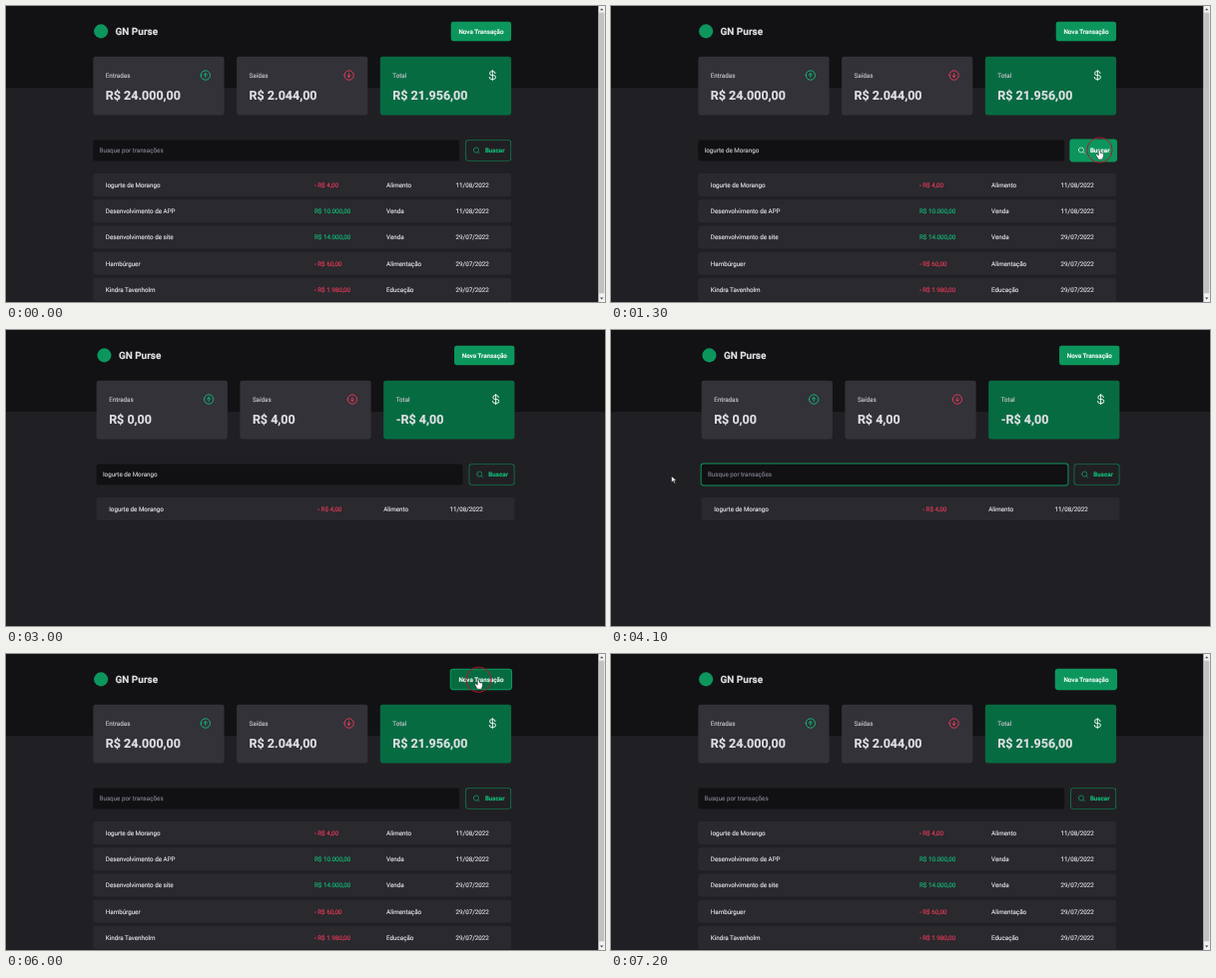
An HTML page that plays this animation: 600x297 px, repeating every 7.3 s.

```html
<!DOCTYPE html>
<html lang="pt-BR">
<head>
<meta charset="utf-8">
<title>Transações</title>
<style>
html, body { margin: 0; width: 100%; height: 100%; overflow: hidden; background: #202024; }
svg { display: block; width: 600px; height: 297px; }
text { font-family: Roboto, sans-serif; text-rendering: geometricPrecision; white-space: pre; stroke-width: .35; }
</style>
</head>
<body>
<svg id="stage" viewBox="0 0 1536 760.32"></svg>
<script>
const LOOP = 7300, STEP = 100;
const stage = document.getElementById('stage');

const C = {
  head: '#121214', body: '#202024', row: '#29292e', card: '#323238', field: '#111013',
  text: '#e1e1e6', soft: '#c4c4cc', hint: '#7c7c8a',
  green: '#0c965d', dark: '#076b42', bright: '#12bd78', red: '#ee3a5a', crimson: '#a0122c'
};

const ROWS = [
  ['Iogurte de Morango', '- R$ 4,00', 'Alimento', '11/08/2022'],
  ['Desenvolvimento de APP', 'R$ 10.000,00', 'Venda', '11/08/2022'],
  ['Desenvolvimento de site', 'R$ 14.000,00', 'Venda', '29/07/2022'],
  ['Hambúrguer', '- R$ 60,00', 'Alimentação', '29/07/2022'],
  ['Kindra Tavenholm', '- R$ 1.980,00', 'Educação', '29/07/2022']
];
const QUERY = ROWS[0][0];

const CIRCLE = 'M32 128a96 96 0 1 0 192 0a96 96 0 1 0 -192 0';
const UP = CIRCLE + 'M94 122L128 88L162 122M128 168V88';
const DOWN = CIRCLE + 'M94 134L128 168L162 134M128 88V168';
const DOLLAR = 'M128 24V232M184 88a40 40 0 0 0-40-40H112a40 40 0 0 0 0 80h40a40 40 0 0 1 0 80H104a40 40 0 0 1-40-40';
const LENS = 'M32 116a84 84 0 1 0 168 0a84 84 0 1 0 -168 0M175 175L224 224';
const CROSS = 'M60 60L196 196M196 60L60 196';

const HAND = 'M0 0c-2 0-3 1-3 3v11l-3-3c-2-2-5 0-3 3l6 10h10l3-8v-6c0-2-3-3-4-1c0-2-3-3-4-1v-5c0-2-1-3-2-3z';
const ARROW = 'M0 0V16l4-4l3 6l3-1l-3-6h5z';
const BEAM = 'M-4-9h8M0-9V9M-4 9h8';

// pointer stops: time, x, y
const PATH = [
  [100, 440, 725], [300, 500, 371], [900, 500, 371], [1100, 1253, 370], [1700, 1253, 370],
  [3200, 440, 371], [3400, 395, 371], [3800, 8, 371], [4000, 28, 376], [4500, 1253, 370],
  [4800, 1253, 370], [5100, 1222, 179], [5400, 1212, 66], [6100, 1212, 66], [6300, 660, 466],
  [6400, 660, 466], [6600, 876, 466], [6700, 876, 466], [6900, 998, 152], [7200, 998, 152]
];
const CLICKS = [250, 1150, 4550, 5850, 6250, 6550, 6950];

const within = (t, a, b) => t >= a && t < b;

function rect(x, y, w, h, fill, ring = '', r = 6) {
  const halo = ring && `<rect x="${x - 2.5}" y="${y - 2.5}" width="${w + 5}" height="${h + 5}" rx="${r + 2}" fill="${ring}"/>`;
  return halo + `<rect x="${x}" y="${y}" width="${w}" height="${h}" rx="${r}" fill="${fill}"/>`;
}

// y is the vertical middle of the capitals
function text(x, y, str, fill = C.text, size = 16, weight = 400, anchor = 'start') {
  return `<text x="${x}" y="${y + size * .355}" fill="${fill}" stroke="${fill}" font-size="${size}" font-weight="${weight}" text-anchor="${anchor}">${str}</text>`;
}

function icon(x, y, size, color, d) {
  return `<path transform="translate(${x - size / 2} ${y - size / 2}) scale(${size / 256})" d="${d}"
    fill="none" stroke="${color}" stroke-width="19" stroke-linecap="round" stroke-linejoin="round"/>`;
}

function pointer(t) {
  if (t < 100 || within(t, 1700, 3200) || t >= 7200) return null;
  const i = PATH.findIndex(p => p[0] > t);
  const [t0, x0, y0] = PATH[i - 1], [t1, x1, y1] = PATH[i];
  const p = (t - t0) / (t1 - t0), k = p * p * (3 - 2 * p);
  return { x: x0 + (x1 - x0) * k, y: y0 + (y1 - y0) * k };
}

const over = (m, x, y, w, h) => !!m && m.x >= x && m.x <= x + w && m.y >= y && m.y <= y + h;

function card(x, label, value, d, color, fill) {
  return rect(x, 130, 336, 150, fill) + text(x + 32, 178, label, C.soft) +
    icon(x + 288, 178, 32, color, d) + text(x + 32, 230, value, C.text, 32, 700);
}

function searchBar(t, x, m) {
  const typed = t < 1700 ? Math.round(Math.max(0, Math.min(1, (t - 300) / 600)) * QUERY.length)
    : t < 4000 ? QUERY.length : 0;
  const focus = within(t, 300, 1100) || within(t, 3400, 4500);
  const busy = within(t, 1400, 1700) || within(t, 4700, 5200);
  const hot = !busy && over(m, x + 955, 344, 117, 54);
  const ring = within(t, 1150, 1400) || within(t, 4550, 4700);
  const ink = hot ? '#fff' : C.bright;
  let s = rect(x, 344, 939, 54, C.field, focus ? C.green : '');
  if (within(t, 3400, 4000)) {
    const end = x + 156, from = Math.max(x + 16, Math.min(end, m.x));
    s += rect(from, 361, end - from, 20, '#2f6fc4', '', 0);
  }
  s += typed ? text(x + 16, 371, QUERY.slice(0, typed), C.soft) : text(x + 16, 371, 'Busque por transações', C.hint);
  s += `<g opacity="${busy ? .65 : 1}">` + rect(x + 955, 344, 117, 54, C.green, ring ? C.green : '') +
    rect(x + 956.5, 345.5, 114, 51, hot ? C.green : C.body, '', 5) +
    icon(x + 983, 371, 20, ink, LENS) + text(x + 1005, 371, 'Buscar', ink, 16, 700) + '</g>';
  return s;
}

function list(x, filtered) {
  const cat = filtered ? 736 : 752, date = filtered ? 906 : 930;
  return ROWS.slice(0, filtered ? 1 : 5).map(([name, price, kind, day], i) => {
    const y = 430 + i * 67.2, mid = y + 30;
    return rect(x, y, 1072, 59.2, C.row) + text(x + 32, mid, name) +
      text(x + 567.5, mid, price, price[0] === '-' ? C.red : C.bright) +
      text(x + cat, mid, kind) + text(x + date, mid, day);
  }).join('');
}

function scrollbar() {
  return rect(1519, 0, 17, 761, '#f1f1f1', '', 0) + rect(1521, 17, 13, 721, '#c1c1c1', '', 0) +
    '<path d="M1523 11l4.5-5l4.5 5zM1523 749l4.5 5l4.5-5z" fill="#505050"/>';
}

function modal(t) {
  const inOn = within(t, 6300, 6600), outOn = t >= 6600;
  const fields = ['Descrição', 'Preço', 'Categoria'].map((label, i) =>
    rect(560, 229.5 + i * 67.2, 416, 51.2, C.head) + text(576, 255 + i * 67.2, label, C.hint)).join('');
  const close = t >= 6800
    ? '<rect x="982.5" y="149.5" width="21" height="20" rx="1" fill="none" stroke="#12bd78" stroke-width="2"/>' : '';
  return '<rect width="1536" height="761" opacity=".75"/>' + rect(512, 128, 512, 505, C.body) +
    text(560, 182, 'Nova Transação', C.text, 24, 700) + close + icon(993, 159.5, 20, C.bright, CROSS) + fields +
    rect(560, 439, 200, 56, inOn ? C.green : C.row) + icon(628.5, 467, 24, inOn ? '#fff' : C.bright, UP) +
    text(649, 467, 'Entrada', C.text) +
    rect(776, 439, 200, 56, outOn ? C.crimson : C.row) + icon(852, 467, 24, outOn ? '#fff' : C.red, DOWN) +
    text(873, 467, 'Saída', C.text) +
    rect(560, 535, 416, 58, C.green) + text(768, 563.5, 'Cadastrar', '#fff', 16, 700, 'middle');
}

function mouse(t, m, x, open) {
  if (!m) return '';
  const link = open
    ? over(m, 560, 439, 416, 56) || over(m, 976, 145, 30, 30)
    : over(m, x + 955, 344, 117, 54) || over(m, x + 918, 40, 154, 50);
  const typing = !open && over(m, x, 344, 939, 54);
  const click = CLICKS.find(c => within(t, c, c + 200));
  const ring = click === undefined ? '' :
    `<circle cx="${m.x}" cy="${m.y}" r="${12 + 27 * (t - click) / 200}" fill="none" stroke="#b3152f" stroke-width="2.5"/>`;
  const shape = typing
    ? `<path d="${BEAM}" fill="none" stroke="#ddd" stroke-width="1.5"/>`
    : `<path d="${link ? HAND : ARROW}" fill="#fff" stroke="#111" stroke-width="1.2"/>`;
  return ring + `<g transform="translate(${m.x} ${m.y})">${shape}</g>`;
}

function draw(t) {
  const filtered = within(t, 1700, 5200), open = within(t, 6100, 7100);
  const x = filtered ? 232 : 223.5;
  const m = pointer(t), free = open ? null : m;
  const totals = filtered ? ['R$ 0,00', 'R$ 4,00', '-R$ 4,00'] : ['R$ 24.000,00', 'R$ 2.044,00', 'R$ 21.956,00'];
  const hot = over(free, x + 918, 40, 154, 50);
  const ring = within(t, 5850, 6100) || t >= 7100;
  stage.innerHTML =
    rect(0, 0, 1536, 761, C.body, '', 0) + rect(0, 0, 1536, 210, C.head, '', 0) +
    `<circle cx="${x + 20}" cy="65" r="18" fill="${C.green}"/>` +
    text(x + 57, 65, 'GN Purse', C.text, 25.5, 700) +
    rect(x + 917.5, 40, 154.5, 50, hot ? C.dark : C.green, ring ? C.green : '') +
    text(x + 995, 65, 'Nova Transação', '#fff', 16, 500, 'middle') +
    card(x, 'Entradas', totals[0], UP, C.bright, C.card) +
    card(x + 368, 'Saídas', totals[1], DOWN, C.red, C.card) +
    card(x + 736, 'Total', totals[2], DOLLAR, '#fff', C.dark) +
    searchBar(t, x, free) + list(x, filtered) +
    (filtered || open ? '' : scrollbar()) +
    (open ? modal(t) : '') + mouse(t, m, x, open);
}

let last = -1;
function tick() {
  const t = Math.floor(performance.now() % LOOP / STEP) * STEP;
  if (t !== last) draw(last = t);
  requestAnimationFrame(tick);
}
tick();
</script>
</body>
</html>
```
